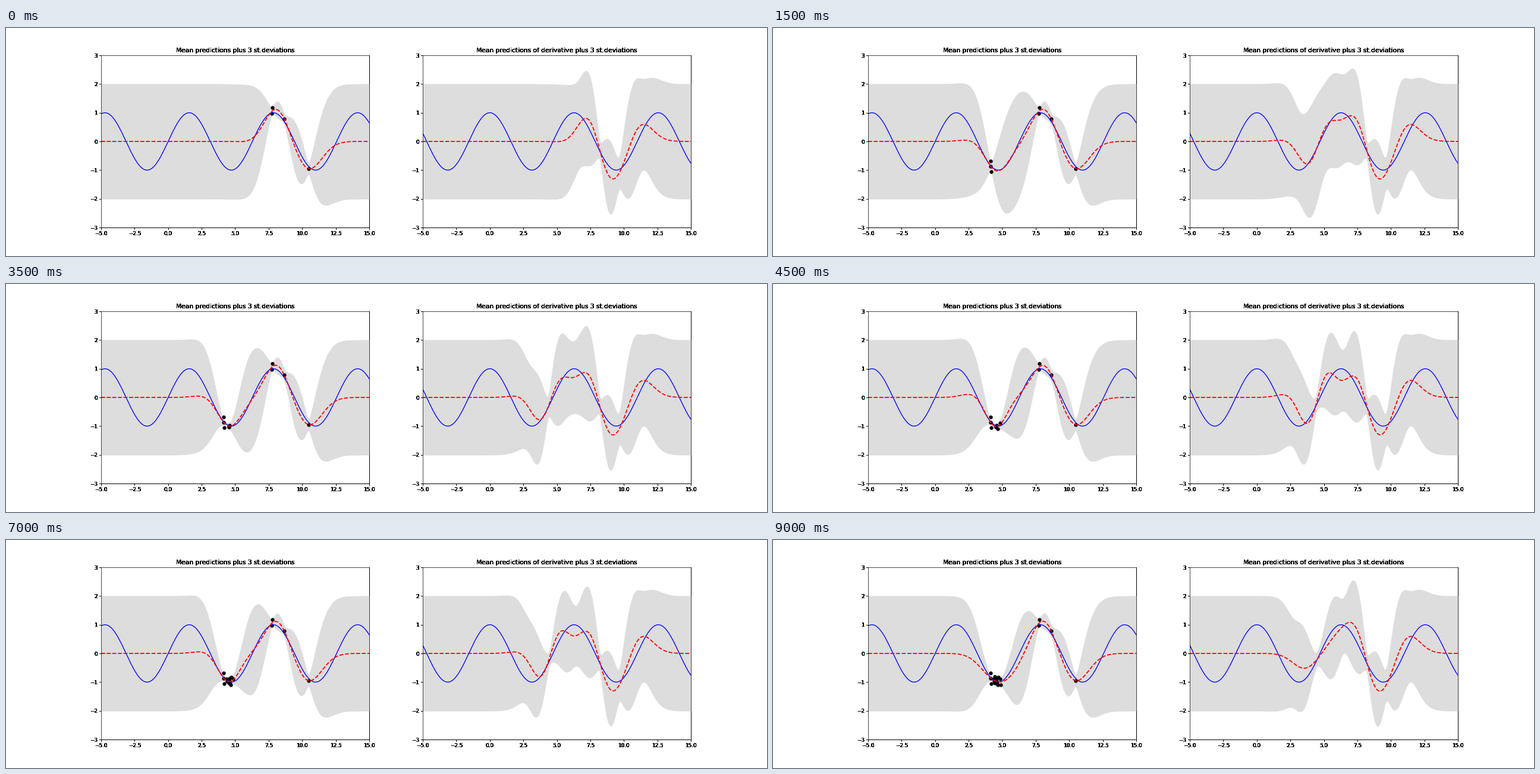
These frames come from a looping animation (1280 by 384 pixels, 9.5 s). A matplotlib script:

```python
import numpy as np
import matplotlib.pyplot as plt
from matplotlib.animation import FuncAnimation

DPI = 64
NOISE = 0.01        # observation variance
TEXT_LAYERS = 10    # stacked axes give the labels their heavy, overdrawn look
GRID = np.linspace(-5, 15, 500)
KNOWN = np.array([(7.735, 0.965), (7.795, 1.175), (8.66, 0.785), (10.47, -0.955)])


def noisy_sine(x, error):
    return np.column_stack([x, np.sin(x) + error])


def observations():
    """Points in the order they are taken, closing in on the minimum of sin."""
    first = np.linspace((4.13, -0.69), (4.165, -1.05), 3)

    # A sweep to the right whose error alternates and grows.
    k = np.arange(6)
    t = k / 5
    sweep = noisy_sine(4.53 + 0.315 * t ** 3, -0.13 * t ** 2 * (-1.0) ** k - 0.02)

    # Settling around the minimum, from side to side.
    k = np.arange(8)
    settle = noisy_sine(4.5 + 0.2 * (-0.8) ** k,
                        0.05 + 0.12 * np.cos(2 * np.pi * (k + 0.25) / 5))

    last = [(4.905, -1.105)]
    return np.vstack([KNOWN, first, sweep, settle, last])


def posterior(px, py):
    """Mean and deviation of the process and of its derivative on GRID."""
    cov = np.exp(-0.5 * (px[:, None] - px) ** 2) + NOISE * np.eye(len(px))
    gap = px[:, None] - GRID
    value = np.exp(-0.5 * gap ** 2)
    result = []
    for cross in (value, gap * value):
        solved = np.linalg.solve(cov, cross)
        variance = 1 - np.sum(cross * solved, axis=0)
        result.append((py @ solved, np.sqrt(np.maximum(variance, 0))))
    return result


def make_axes(index, title):
    ax = fig.add_subplot(1, 2, index)
    ax.set(xlim=(-5, 15), ylim=(-3, 3))
    ax.set_title(title, fontsize=12)
    return ax


class Panel:
    def __init__(self, index, title, truth):
        for _ in range(TEXT_LAYERS):
            ax = make_axes(index, title)
        self.dots, = ax.plot([], [], "ko", ms=6)
        ax.plot(GRID, truth(GRID), "b-", lw=1.5)
        self.band = ax.fill_between(GRID, -2, 2, color="#dddddd")
        self.mean, = ax.plot([], [], "r--", lw=2)

    def show(self, mean, deviation):
        low, high = mean - 2 * deviation, mean + 2 * deviation
        outline = np.column_stack([np.r_[GRID, GRID[::-1]],
                                   np.r_[low, high[::-1]]])
        self.band.set_verts([outline])
        self.mean.set_data(GRID, mean)


plt.rcParams.update({"font.family": "DejaVu Sans", "font.size": 10})
fig = plt.figure(figsize=(1280 / DPI, 384 / DPI), dpi=DPI, facecolor="white")
fig.subplots_adjust(left=0.125, right=0.9, bottom=0.125, top=0.88, wspace=0.2)
panels = [
    Panel(1, "Mean predictions plus 3 st.deviations", np.sin),
    Panel(2, "Mean predictions of derivative plus 3 st.deviations", np.cos),
]
points = observations()


def update(frame):
    px, py = points[:len(KNOWN) + frame].T
    panels[0].dots.set_data(px, py)
    for panel, curves in zip(panels, posterior(px, py)):
        panel.show(*curves)
    return []


animation = FuncAnimation(fig, update, frames=len(points) - len(KNOWN) + 1,
                          interval=500, repeat=True, repeat_delay=0, blit=False)
plt.show()
```
